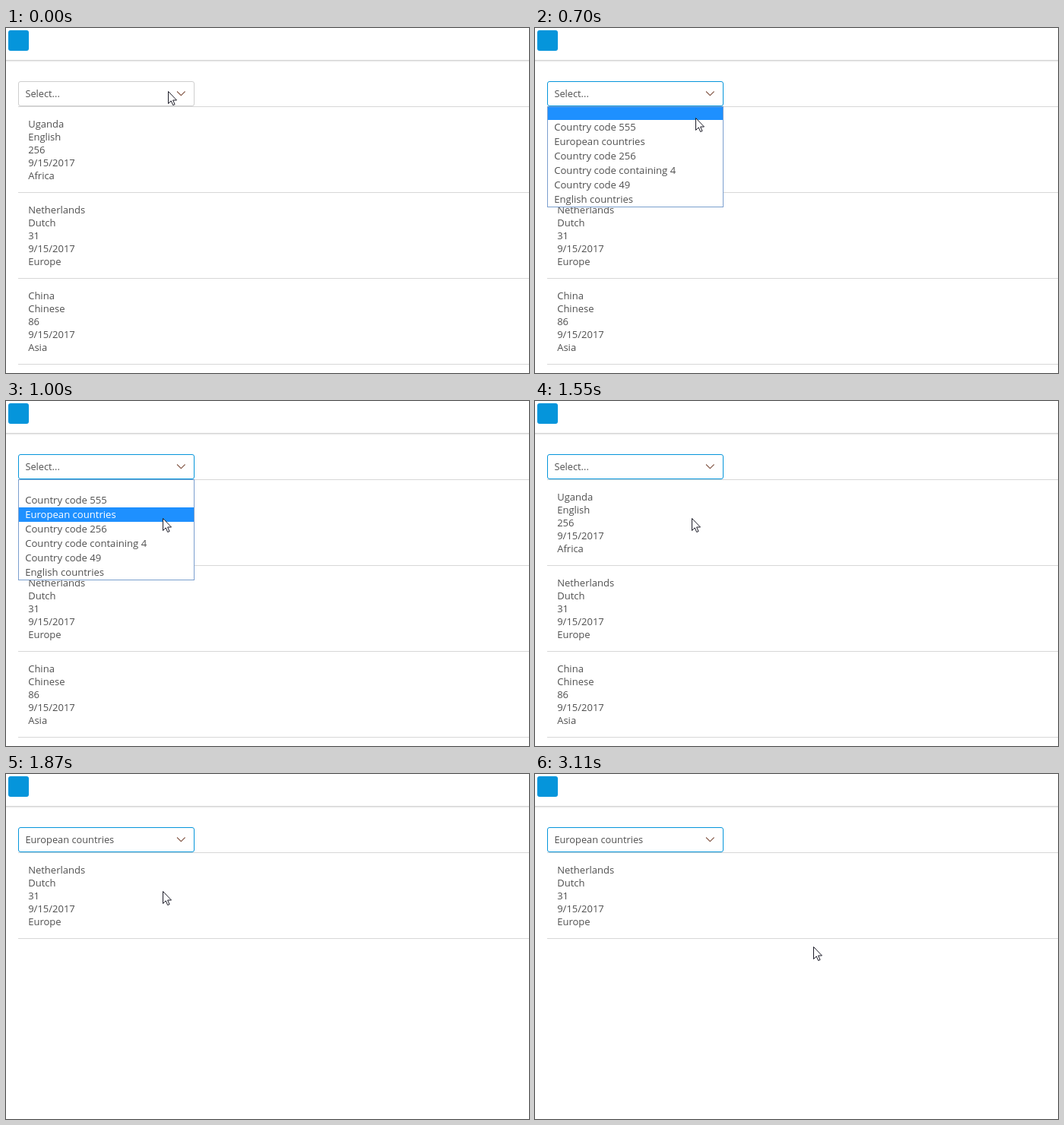
An HTML page for the animation above (3.58 s loop, 688 px wide and 454 px high).

```html
<!DOCTYPE html>
<html lang="en">
<head>
<meta charset="utf-8">
<title>Country filter</title>
<style>
  html, body { margin: 0; width: 100%; height: 100%; overflow: hidden; background: #fff; }
  svg { display: block; }
  text { font: 13px "Open Sans", sans-serif; fill: #505050; }
  #value { font-size: 12.8px; }
  #menu text { font-size: 13.1px; }
  #menu .on { fill: #fff; }
</style>
</head>
<body>
<svg id="stage" width="688" height="454" viewBox="0 0 688 454">
  <rect width="688" height="454" fill="#fff"/>
  <rect x="3" y="3" width="27" height="27" rx="3" fill="#0595db"/>
  <rect y="42" width="688" height="1" fill="#d3d3d3"/>
  <rect y="43" width="688" height="1" fill="#ebebeb"/>
  <rect y="44" width="688" height="1" fill="#f7f7f7"/>
  <rect x="16" y="103" width="672" height="1" fill="#d7d7d7"/>
  <g id="list"></g>
  <rect id="box" x="16.5" y="70.5" width="231" height="32" rx="2.5" fill="#fff"/>
  <text id="value" x="25.4" y="91"></text>
  <path d="M225 83.5l5.3 5.2 5.3-5.2" fill="none" stroke="#875c4b" stroke-width="1.1"/>
  <g id="menu">
    <rect x="16.5" y="103.5" width="231" height="132" fill="#fff" stroke="#7b9fce"/>
    <rect id="mark" x="17" width="230" fill="#1e90ff"/>
  </g>
  <path id="cursor" d="M.5.5v16l3.7-3.6 2.5 5.6 2.4-1-2.5-5.5h4.9z" fill="#fff" stroke="#1c1c28" stroke-width="1"/>
</svg>
<script>
const LOOP = 3580;
const $ = id => document.getElementById(id);

function add(parent, tag, attrs, text = '') {
  const el = document.createElementNS('http://www.w3.org/2000/svg', tag);
  for (const key in attrs) el.setAttribute(key, attrs[key]);
  el.textContent = text;
  return parent.appendChild(el);
}

const countries = [
  ['Uganda', 'English', '256', 'Africa'],
  ['Netherlands', 'Dutch', '31', 'Europe'],
  ['China', 'Chinese', '86', 'Asia']
];
const rows = countries.map(([name, language, code, region]) => {
  const row = add($('list'), 'g', {});
  [name, language, code, '9/15/2017', region].forEach((line, i) =>
    add(row, 'text', { x: 29.2, y: 131 + 17 * i }, line));
  add(row, 'rect', { x: 16, y: 216, width: 672, height: 1, fill: '#d7d7d7' });
  return row;
});

const options = [
  '', 'Country code 555', 'European countries', 'Country code 256',
  'Country code containing 4', 'Country code 49', 'English countries'
].map((label, i) => add($('menu'), 'text', { x: 25.2, y: 116 + 19 * i }, label));

// Each step overrides only what changes at its time (ms).
const steps = [
  [0, { at: [213, 83], focus: false, open: false, mark: -1, value: 'Select...', shown: [0, 1, 2] }],
  [150, { focus: true }],
  [230, { open: true }],
  [550, { at: [213, 90] }],
  [630, { at: [212, 105], mark: 0 }],
  [700, { at: [211, 118] }],
  [770, { at: [210, 129], mark: 1 }],
  [850, { at: [208, 140], mark: 2 }],
  [930, { at: [207, 149] }],
  [1000, { at: [206, 154] }],
  [1550, { open: false }],
  [1630, { value: 'European countries' }],
  [1800, { shown: [] }],
  [1870, { shown: [1] }],
  [2860, { at: [228, 163] }],
  [2940, { at: [284, 188] }],
  [3030, { at: [340, 214] }],
  [3110, { at: [366, 227] }]
];

const show = (el, on) => el.setAttribute('display', on ? 'inline' : 'none');

function draw(time) {
  const s = Object.assign({}, ...steps.filter(([start]) => start <= time).map(step => step[1]));
  $('cursor').setAttribute('transform', `translate(${s.at})`);
  $('box').setAttribute('stroke', s.focus ? '#0595db' : '#cecece');
  $('value').textContent = s.value;

  show($('menu'), s.open);
  show($('mark'), s.mark >= 0);
  const top = Math.max(104, 102 + 19 * s.mark);
  $('mark').setAttribute('y', top);
  $('mark').setAttribute('height', 121 + 19 * s.mark - top);
  options.forEach((el, i) => el.classList.toggle('on', i === s.mark));

  rows.forEach((row, i) => {
    const slot = s.shown.indexOf(i);
    show(row, slot >= 0);
    row.setAttribute('transform', `translate(0 ${113 * slot})`);
  });
}

const begin = performance.now();
function tick(now) {
  draw(Math.max(0, now - begin) % LOOP);
  requestAnimationFrame(tick);
}
draw(0);
requestAnimationFrame(tick);
</script>
</body>
</html>
```
